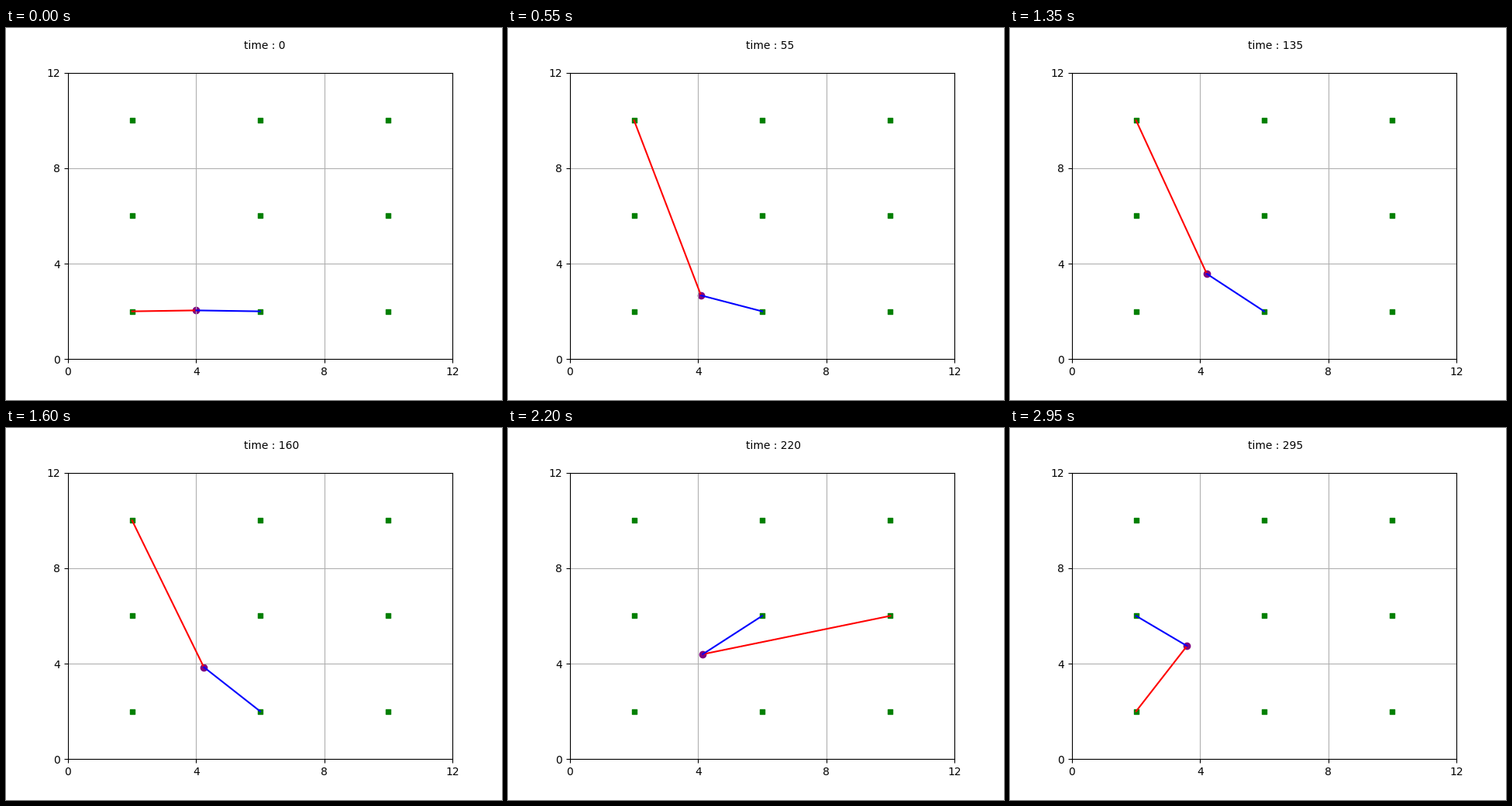
Recreate the animation shown at these times as a matplotlib script. Size 640 px wide and 480 px high, loop 3000 ms.

```python
import numpy as np
import matplotlib.pyplot as plt
from matplotlib.animation import FuncAnimation

FRAMES, INTERVAL, STEP = 60, 50, 5
CELL = 4
SITES = np.arange(CELL / 2, 3 * CELL, CELL)

# The node walks straight between these turns: time, x, y
TURNS = [(0, 4.0, 2.04), (100, 4.165, 3.18), (200, 4.29, 4.3), (295, 3.59, 4.74)]

# Red link: when it hops and the site it hops to
HOPS = [(0, (2, 2)), (30, (2, 10)), (200, (10, 6)), (250, (10, 2)), (285, (2, 2))]


def position(t):
    times, xs, ys = zip(*TURNS)
    return np.interp(t, times, xs), np.interp(t, times, ys)


def cell_site(pos):
    """Centre of the cell that holds the position."""
    return [CELL * (v // CELL + 0.5) for v in pos]


def hop_site(t):
    return [site for start, site in HOPS if start <= t][-1]


def connect(line, a, b):
    line.set_data(*zip(a, b))


fig, ax = plt.subplots(figsize=(6.4, 4.8), dpi=100)
ticks = range(0, 3 * CELL + 1, CELL)
ax.set(xlim=(0, 12), ylim=(0, 12), xticks=ticks, yticks=ticks)
ax.grid(True)

ax.scatter(*np.meshgrid(SITES, SITES), s=15, c="green", marker="s")
node = ax.scatter([], [], s=36, color="purple")
red, = ax.plot([], [], color="red")
blue, = ax.plot([], [], color="blue")
label = ax.text(5.5, 13, "")


def update(i):
    t = i * STEP
    pos = position(t)
    node.set_offsets([pos])
    connect(red, hop_site(t), pos)
    connect(blue, cell_site(pos), pos)
    label.set_text(f"time : {t}")
    return node, red, blue, label


anim = FuncAnimation(fig, update, frames=FRAMES, interval=INTERVAL,
                     repeat=True, repeat_delay=0)
plt.show()
```
